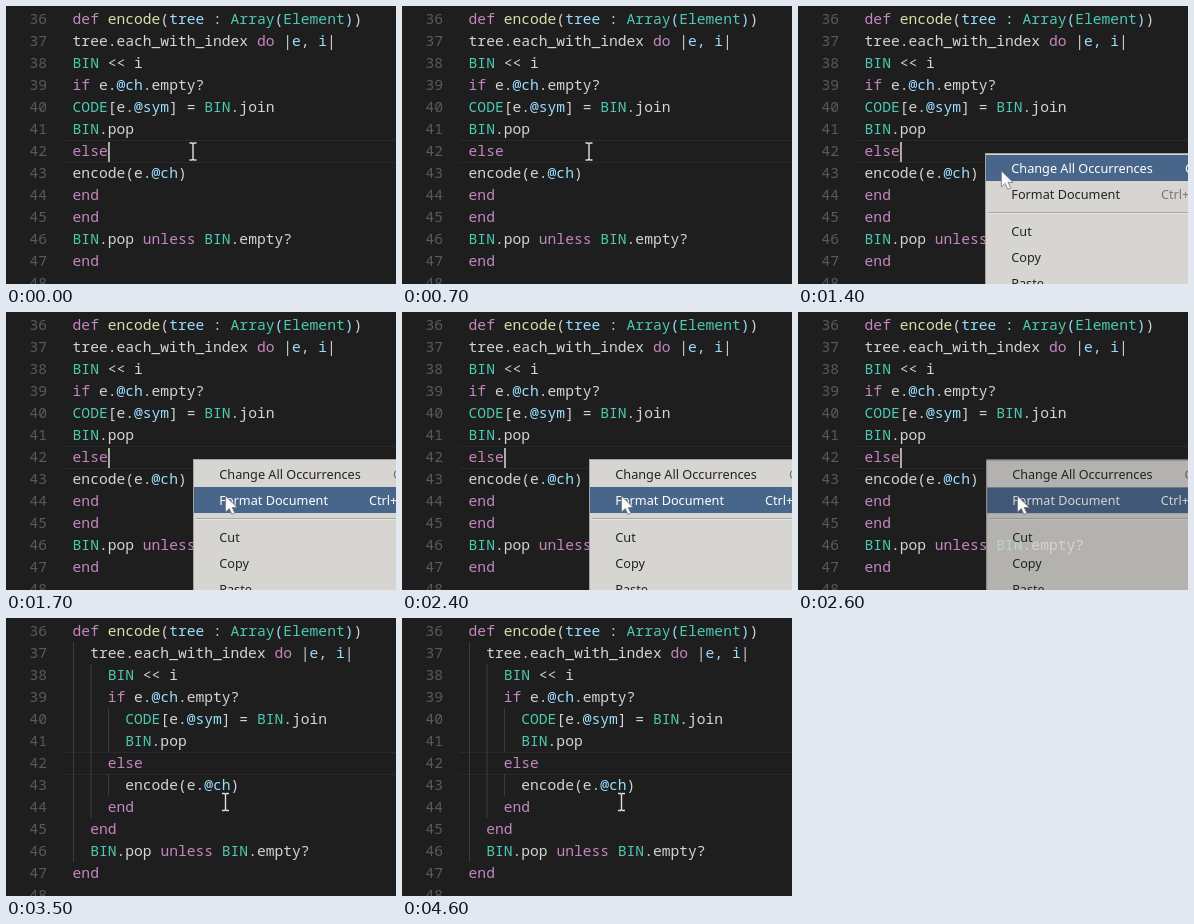
Recreate the animation shown at these times as an HTML page. Size 390 by 278 pixels, loop 4.7 s.

```html
<!DOCTYPE html>
<html lang="en">
<head>
<meta charset="utf-8">
<title>Format document</title>
<style>
  html, body { margin: 0; width: 100%; height: 100%; overflow: hidden; background: #1e1e1e; }
  svg { display: block; width: 390px; height: 278px; }
  text { white-space: pre; }
  .code { font: 14.63px "Noto Sans Mono", "DejaVu Sans Mono", monospace; fill: #d4d4d4; font-variant-ligatures: none; }
  .number { fill: #5a5a5a; }
  .keyword { fill: #c586c0; }
  .type { fill: #4ec9b0; }
  .variable { fill: #9cdcfe; }
  .method { fill: #dcdcaa; }
  .menu { font: 12.7px "Noto Sans", "Open Sans", sans-serif; fill: #232323; }
  .menu .shortcut { fill: #777675; }
  .menu .active { fill: #fff; }
</style>
</head>
<body>
<svg viewBox="0 0 390 278">
  <rect width="390" height="278" fill="#1e1e1e"/>
  <path d="M57 134.5H390M57 156.5H390" stroke="#292929"/>
  <path id="guides" d="M67.5 24V244M85 46V200M102.5 90V134M102.5 156V178" stroke="#3c3c3c" fill="none"/>
  <g id="editor" class="code"></g>
  <rect id="caret" y="136" width="1.7" height="20" fill="#c4c4c2"/>
  <g id="menu" class="menu">
    <rect x="187" y="147" width="290" height="190" fill="#d7d5d1"/>
    <path d="M187.5 337V147.5H477" fill="none" stroke="#a3a2a0"/>
    <rect id="highlight" x="188" width="289" height="26" fill="#48658a"/>
    <path d="M190 206.5H477" stroke="#aaa8a5"/>
    <path d="M190 207.5H477" stroke="#e6e4e1"/>
    <g id="items"></g>
  </g>
  <path id="beam" d="M-3.5 -8.5H-1L0 -7.5L1 -8.5H3.5M0 -7.5V7.5M-3.5 8.5H-1L0 7.5L1 8.5H3.5" fill="none" stroke="#dedede" stroke-width="1.4"/>
  <path id="arrow" d="M0 0V16L3.8 12.6L6.4 18.4L9.3 17L6.7 11.5H11.7Z" fill="#fafafa" stroke="#77777a" stroke-width=".8" stroke-linejoin="round"/>
</svg>
<script>
const LOOP = 4700;
const OPEN = 1000, FORMAT = 2700, CLOSED = 2900;
const CHAR = 8.78, LEFT = 66.6, LINE = 22;

const source = [
  [0, 'def encode(tree : Array(Element))'],
  [1, 'tree.each_with_index do |e, i|'],
  [2, 'BIN << i'],
  [2, 'if e.@ch.empty?'],
  [3, 'CODE[e.@sym] = BIN.join'],
  [3, 'BIN.pop'],
  [2, 'else'],
  [3, 'encode(e.@ch)'],
  [2, 'end'],
  [1, 'end'],
  [1, 'BIN.pop unless BIN.empty?'],
  [0, 'end'],
  [0, '']
];
const menuItems = [
  ['Change All Occurrences', 166.5, 'Ctrl+F2', 387],
  ['Format Document', 192.5, 'Ctrl+Shift+I', 363],
  ['Cut', 230],
  ['Copy', 256],
  ['Paste', 282]
];

const byId = id => document.getElementById(id);
const clamp = v => Math.max(0, Math.min(1, v));
const progress = (t, from, to) => clamp((t - from) / (to - from));
const smooth = p => p * p * (3 - 2 * p);
const show = (node, on) => node.setAttribute('visibility', on ? 'visible' : 'hidden');
const moveTo = (node, x, y) => node.setAttribute('transform', `translate(${x} ${y})`);

function addText(parent, x, y, content, className) {
  const node = document.createElementNS('http://www.w3.org/2000/svg', 'text');
  node.setAttribute('x', x);
  node.setAttribute('y', y);
  if (className) node.setAttribute('class', className);
  node.innerHTML = content;
  parent.append(node);
  return node;
}

const tokens = /(?<keyword>\b(?:def|do|if|else|end|unless)\b)|(?<method>(?<=def )\w+)|(?<type>\b[A-Z]\w*)|(?<variable>@\w+|(?<=\()tree :|(?<=\|)e, i|(?<=Array)\(|(?<=Element)\))/g;

function paint(line) {
  const safe = line.replace(/</g, '&lt;');
  return safe.replace(tokens, (word, ...args) => {
    const groups = args.at(-1);
    const kind = Object.keys(groups).find(name => groups[name]);
    return `<tspan class="${kind}">${word}</tspan>`;
  });
}

const lines = source.map(([depth, line], i) => {
  const y = 18 + i * LINE;
  addText(byId('editor'), 23.5, y, 36 + i, 'number');
  return { depth, node: addText(byId('editor'), LEFT, y, paint(line)) };
});

const rows = menuItems.map(([label, y, shortcut, x]) => {
  const row = [addText(byId('items'), 213.3, y, label)];
  if (shortcut) row.push(addText(byId('items'), x, y, shortcut, 'shortcut'));
  return row;
});

function drawMenu(t, pointerY) {
  const menu = byId('menu');
  const visible = t >= OPEN && t < CLOSED;
  show(menu, visible);
  if (!visible) return;

  const closing = progress(t, 2550, 2800);
  const fadeIn = 0.5 + 0.42 * progress(t, OPEN, 1100) + 0.08 * progress(t, 1100, 1200);
  const fadeOut = 1 - 0.92 * closing - 0.08 * progress(t, 2800, CLOSED);
  menu.setAttribute('opacity', fadeIn * fadeOut);
  menu.setAttribute('transform', `translate(330 225) scale(${1 - 0.04 * closing}) translate(-330 -225)`);

  const active = pointerY >= 175 ? 1 : pointerY > 151 ? 0 : -1;
  byId('highlight').setAttribute('y', 149 + 26 * active);
  byId('highlight').setAttribute('opacity', active < 0 ? 0 : 1);
  rows.forEach((row, i) => row.forEach(node => node.classList.toggle('active', i === active)));
}

function render(t) {
  const formatted = t >= FORMAT;
  const indent = depth => LEFT + (formatted ? depth * 2 * CHAR : 0);
  lines.forEach(({ depth, node }) => node.setAttribute('x', indent(depth)));
  show(byId('guides'), formatted);

  const blinkTime = formatted ? t - FORMAT : t;
  const frozen = t >= OPEN && !formatted;
  byId('caret').setAttribute('x', indent(2) + 4 * CHAR + 0.4);
  show(byId('caret'), frozen || blinkTime % 1000 < 500);

  const travel = smooth(progress(t, 1200, 1600));
  const x = 187 + 32.5 * travel, y = 145.5 + 38.5 * travel;
  moveTo(byId('beam'), x, y);
  moveTo(byId('arrow'), x, y);
  show(byId('arrow'), frozen);
  show(byId('beam'), !frozen);
  drawMenu(t, y);
}

const start = performance.now();
function tick() {
  render((performance.now() - start) % LOOP);
  requestAnimationFrame(tick);
}
tick();
</script>
</body>
</html>
```
